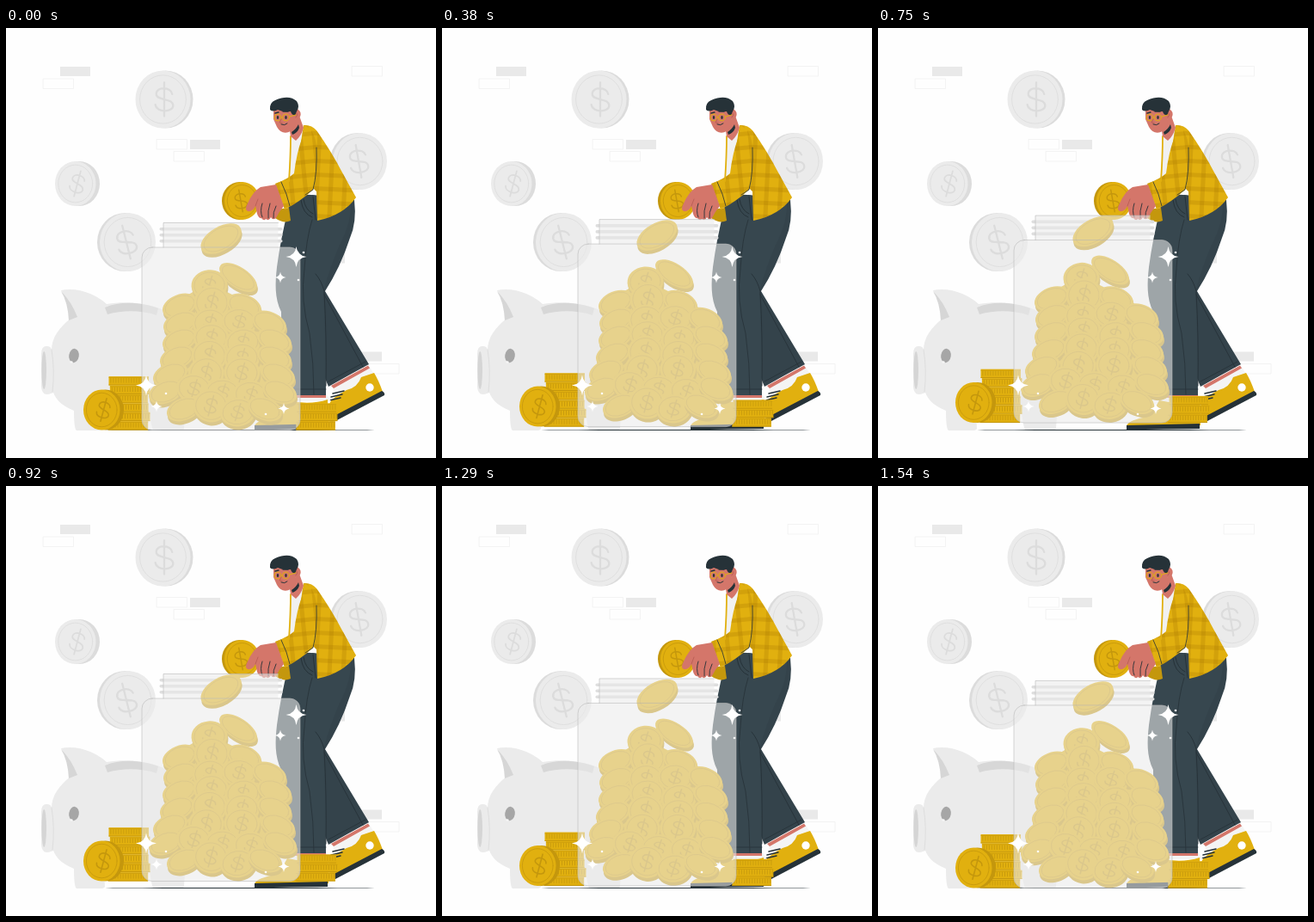
Recreate the animation shown at these times as an HTML page with a canvas. Size 500x500 px, loop 1580 ms.

```html
<!DOCTYPE html>
<html lang="en">
<head>
<meta charset="utf-8">
<title>Savings jar</title>
<style>
  html, body { margin: 0; width: 100%; height: 100%; overflow: hidden; background: #fefefe; }
  canvas { display: block; width: 500px; height: 500px; }
</style>
</head>
<body>
<canvas id="stage"></canvas>
<script>
const canvas = document.getElementById('stage');
const ctx = canvas.getContext('2d');
const ratio = window.devicePixelRatio || 1;
canvas.width = canvas.height = 500 * ratio;

const FPS = 24, FRAMES = 38, LOOP = 1580, LIFT = 8.5;
const NAVY = '#37474f', INK = '#263238', SKIN = '#d4766a', SKIN_DARK = '#b55b52';
const GOLD = { face: '#e1b00f', rim: '#c4970d' };
const GREY = { face: '#ebebeb', rim: '#dcdcdc' };
const GLASS_EDGE = 'rgba(185,185,185,.75)';

function fill(d, color) {
  ctx.fillStyle = color;
  ctx.fill(new Path2D(d));
}

function line(d, color, width = 1) {
  ctx.strokeStyle = color;
  ctx.lineWidth = width;
  ctx.stroke(new Path2D(d));
}

function ellipse(x, y, rx, ry, color, angle = 0) {
  ctx.fillStyle = color;
  ctx.beginPath();
  ctx.ellipse(x, y, rx, ry, angle, 0, 7);
  ctx.fill();
}

function ring(x, y, rx, ry, color, width, angle = 0) {
  ctx.strokeStyle = color;
  ctx.lineWidth = width;
  ctx.beginPath();
  ctx.ellipse(x, y, rx, ry, angle, 0, 7);
  ctx.stroke();
}

function roundRect(x, y, w, h, r) {
  ctx.beginPath();
  ctx.roundRect(x, y, w, h, r);
}

const radians = degrees => degrees * Math.PI / 180;

function dollar(x, y, size, degrees, color, squash = 1) {
  ctx.save();
  ctx.translate(x, y);
  ctx.scale(1, squash);
  ctx.rotate(radians(degrees));
  ctx.scale(size / 38, size / 38);
  line('M9-6C8-14-9-15-9-6C-9 2 10-2 10 7C10 15-9 15-10 6M0-19V19', color, 2.2);
  ctx.restore();
}

// A disc whose edge shows on the side given by (dx, dy).
function disc(x, y, rx, ry, degrees, tone, dx, dy) {
  const angle = radians(degrees);
  ellipse(x + dx, y + dy, rx, ry, tone.rim, angle);
  ellipse(x, y, rx, ry, tone.face, angle);
  ring(x, y, rx * .84, ry * .84, tone.rim, .8, angle);
}

// An upright coin with its sign.
function coin(x, y, r, degrees, tone, edge) {
  disc(x - edge / 2, y, r - Math.abs(edge) / 2, r, 0, tone, edge, 0);
  dollar(x, y, r * 1.17, degrees, tone.rim);
}

function seededRandom(seed) {
  return () => (seed = seed * 16807 % 2147483647) / 2147483647;
}

function drawBackground() {
  ctx.fillStyle = '#fefefe';
  ctx.fillRect(0, 0, 500, 500);
  ctx.fillStyle = '#e9e9e9';
  for (const [x, y] of [[63, 45], [214, 130], [359, 262.5], [402, 376.5]])
    ctx.fillRect(x, y, 35, 11);
  ctx.strokeStyle = '#f0f0f0';
  ctx.lineWidth = .8;
  for (const [x, y] of [[43.5, 59], [402.5, 44.5], [175.5, 129.5], [195.5, 143.5], [422, 390.5]])
    ctx.strokeRect(x, y, 35, 11.5);
  coin(184, 83, 33.5, 0, GREY, 3);
  coin(83, 181, 26, 15, GREY, 4.5);
  coin(140, 249, 34, -14, GREY, -3);
  coin(410, 155, 33, -10, GREY, -3);
}

function drawPig() {
  fill('M64 305C84 301 105 310 117 321C140 317 165 320 181 327C207 342 218 368 216 396C214 424 208 440 207 466Q206 468 203 468H171Q169 463 167 448C149 454 132 454 114 449L115 466Q114 468 110 468H82Q79 466 79 445C67 440 59 434 55 424C46 428 42 426 41 417V379Q41 370 47 370Q53 370 53 375C53 360 62 348 75 338Q72 318 64 305Z', GREY.face);
  fill('M64 306Q76 318 83 336L73 340Q72 319 64 306Z', '#d6d6d6');
  fill('M115 325C134 317 158 319 177 326L175 334C157 328 136 328 118 333Z', '#d7d7d7');
  ellipse(44.2, 398, 2.8, 22, '#d5d5d5');
  line('M53 374Q57 398 54 423', '#dedede');
  ellipse(79, 381, 5.8, 8.2, '#a6a6a6', .15);
  ellipse(76, 388.5, 1.6, 1.2, '#f7f7f7');
}

function drawFeet() {
  ellipse(272, 467.5, 160, .5, INK);
  // trailing foot
  fill('M379 416L422 393L429 404L384 430Z', '#f4f4f4');
  fill('M378 416L421 392.5L423 395.5L381 419Z', SKIN);
  fill('M378 433Q389 424 396 421Q409 418 413 406L428 401Q433 409 438 423L382 453Q370 449 378 433Z', GOLD.face);
  fill('M374 455L437 422Q441 424 440 427L383 457Q376 459 374 455Z', INK);
  ellipse(423, 418, 4.7, 4.7, '#fff');
  line('M380 425L393 422M378 429L391 426M376 433L389 430', INK, 1.5);
  // planted foot
  fill('M323 427H373L378 434H325Z', '#f4f4f4');
  fill('M321 426H372V430H321Z', SKIN);
  fill('M289 463Q290 457 308 453Q320 448 327 433Q353 439 374 432L375 462Z', GOLD.face);
  fill('M289 462L374 460V466Q332 466 289 467.5Z', INK);
}

function drawTrousers() {
  fill('M356 194L405 200Q408 226 400 244Q389 278 371 306L422 391Q398 404 375 417Q356 372 342 329L340 240Z', '#34434b');
  fill('M330 196Q346 192 362 195L363 222Q385 219 401 202Q402 226 388 252Q376 280 369 307Q372 360 372 427H321L320 330C312 314 313 296 315 278Q319 247 328 211Z', NAVY);
  line('M370 306Q367 294 360 286M370 307Q373 360 372 416M370 310L415 394', INK, .9);
  line('M356 223Q349 245 347 280Q342 317 353 355Q358 390 358 426M323 420H372M375 411L418 388', INK, .8);
  line('M343 200Q345 216 356 220M346 199Q348 212 357 216M357 196L360 223', INK);
}

const TORSO = 'M346 113Q355 112 361 119Q378 143 391 168L407 197Q392 218 362 224L361 190L349 178L338 164Z';
const SLEEVE = 'M347 113Q360 119 361 140Q362 170 357 188Q342 202 324 211L313 181Q329 175 335 169Q338 145 344 129Z';

function plaid(shape, angle) {
  fill(shape, GOLD.face);
  ctx.save();
  ctx.clip(new Path2D(shape));
  ctx.translate(360, 168);
  ctx.rotate(angle);
  ctx.fillStyle = 'rgba(165,115,0,.24)';
  for (let p = -80; p < 81; p += 16) {
    ctx.fillRect(p, -90, 5, 180);
    ctx.fillRect(-90, p, 180, 5);
  }
  ctx.restore();
}

function drawTop() {
  fill('M331 127L343 116L349 127L339 169L329 178Z', '#f1f1f1');
  fill('M314 211L329 209L331 224Q323 228 313 221Z', GOLD.rim);
  plaid(TORSO, .05);
  plaid(SLEEVE, -.1);
  line('M331 126Q331 148 329 178', GOLD.face, 1.8);
  line('M361 139Q362 169 357 188L348 194M320 179Q327 193 330 207', INK, .8);
}

function drawHead() {
  fill('M329 114L341 102L346 116Q343 126 337 131L331 126Z', SKIN);
  fill('M332 121Q338 117 340 112L341 116Q339 122 333 124Z', INK);
  fill('M311 95Q314 88 331 88L340 95Q344 98 342 103Q340 107 337 106Q336 116 329 121Q320 124 315 115L311 106Z', SKIN);
  fill('M307 95Q306 87 313 84Q329 77 338 85Q342 91 338 97L336 102Q332 101 331 97Q322 98 316 95Q310 98 307 95Z', INK);
  for (const x of [316, 325.5]) {
    ring(x, 104, 4, 4, GOLD.face, 1);
    ellipse(x, 104, 1.2, 1.9, INK);
  }
  line('M330 103L337 101', GOLD.face);
  line('M313 99L317 98M322 97L328 97', INK, 1.4);
  line('M320 106L318 110L321 110M338 99Q340 101 337 104', SKIN_DARK, .9);
  line('M320 112Q324 114 327 111', INK);
}

function drawHand() {
  coin(273, 201, 22, -10, GOLD, -3);
  fill('M314 182L323 207Q317 214 314 221Q310 224 308 220Q306 225 302 222Q300 225 297 221Q294 222 292 216L290 207Q287 214 281 213Q277 211 281 204Q287 190 296 185Z', SKIN);
  line('M298 204Q295 213 298 220M307 204Q304 213 305 221M314 207Q310 215 311 221', INK, .9);
  line('M290 207L293 199', SKIN_DARK, .8);
}

// Left and right edge of each layer of the heap, top to bottom.
const HEAP = [[215, 258], [181, 298], [182, 327], [181, 333], [178, 333], [170, 337], [165, 339], [186, 322]];

function drawPile() {
  const random = seededRandom(11);
  const layerY = i => 303 + i * 20;
  const side = (edge, inset) => HEAP.map((span, i) => `${span[edge] + inset} ${layerY(i)}`);
  disc(250, 245, 26, 14, -30, GOLD, 1, 4);
  disc(270, 290, 25, 12, 33, GOLD, 1, 4);
  fill(`M${[...side(0, 9), ...side(1, -9).reverse()].join('L')}Z`, GOLD.face);
  HEAP.forEach(([left, right], i) => {
    const r = 21, count = Math.round((right - left) / 38);
    for (let k = 0; k < count; k++) {
      const across = count > 1 ? k / (count - 1) : .5;
      const outer = across === 0 ? -1 : across === 1 ? 1 : 0;
      const x = left + r + across * (right - left - 2 * r);
      const y = layerY(i) + (outer ? 0 : random() * 8 - 4);
      const ry = outer ? 13 : 15 + random() * 6;
      const tilt = outer ? outer * 22 : random() * 24 - 12;
      disc(x, y, r, ry, tilt, GOLD, 1, 4);
      if (!outer) dollar(x, y, 26, 14, GOLD.rim, ry / r);
    }
  });
}

function drawThreads() {
  ctx.fillStyle = '#dedede';
  for (let y = 232; y < 250; y += 7) {
    roundRect(178.5, y, 143, 3.6, 1.8);
    ctx.fill();
  }
}

function drawGlass() {
  ctx.fillStyle = 'rgba(235,235,235,.57)';
  roundRect(158, 255, 184, 212.5, 12);
  ctx.fill();
  ctx.fillRect(183, 226.5, 133.5, 28.5);
  roundRect(158, 255, 184, 212.5, 12);
  ctx.strokeStyle = GLASS_EDGE;
  ctx.lineWidth = .8;
  ctx.stroke();
  line('M183 255V226.5H316.5', GLASS_EDGE, .8);
}

function stack(left, count, width) {
  const height = 10.4;
  for (let i = 0; i < count; i++) {
    const x = left + 1.5 * Math.sin(i * 2), y = 467.5 - (count - i) * height;
    ctx.fillStyle = GOLD.face;
    ctx.fillRect(x, y, width, height);
    ctx.fillStyle = GOLD.rim;
    ctx.fillRect(x, y + height - 1, width, 1);
    ctx.fillRect(x, y + 1.2, width, .6);
    for (let k = 2; k < width; k += 3) ctx.fillRect(x + k, y + 2, .8, 5.5);
  }
}

function drawStacks() {
  stack(119.5, 6, 46.5);
  stack(338.5, 3, 45.5);
  coin(113.5, 444, 23.5, 15, GOLD, 4.5);
}

function sparkle(x, y, r) {
  ctx.save();
  ctx.translate(x, y);
  ctx.scale(r, r);
  fill('M0-1Q.1-.1 1 0Q.1 .1 0 1Q-.1 .1-1 0Q-.1-.1 0-1Z', '#fff');
  ctx.restore();
}

function drawSparkles() {
  for (const [x, y] of [[337.5, 266], [163, 415.5]]) sparkle(x, y, 12);
  for (const [x, y] of [[319, 290], [175, 440], [323, 442.5]]) sparkle(x, y, 6.5);
  for (const [x, y] of [[346, 261], [340, 293], [186, 425], [302, 449]]) ellipse(x, y, 1.3, 1.3, '#fff');
}

function draw(frame) {
  const lift = LIFT * (1 - Math.cos(2 * Math.PI * frame / FRAMES)) / 2;
  ctx.setTransform(ratio, 0, 0, ratio, 0, 0);
  ctx.lineCap = ctx.lineJoin = 'round';
  drawBackground();
  drawPig();
  drawFeet();
  drawTrousers();
  drawTop();
  drawHead();
  drawHand();
  ctx.translate(0, -lift);
  drawThreads();
  drawStacks();
  drawPile();
  drawGlass();
  ctx.translate(0, lift);
  drawSparkles();
}

let shown = -1;
const start = performance.now();
function tick() {
  const time = (performance.now() - start) % LOOP;
  const frame = Math.floor((time + 5) * FPS / 1000) % FRAMES;
  if (frame !== shown) draw(shown = frame);
  requestAnimationFrame(tick);
}
tick();
</script>
</body>
</html>
```
